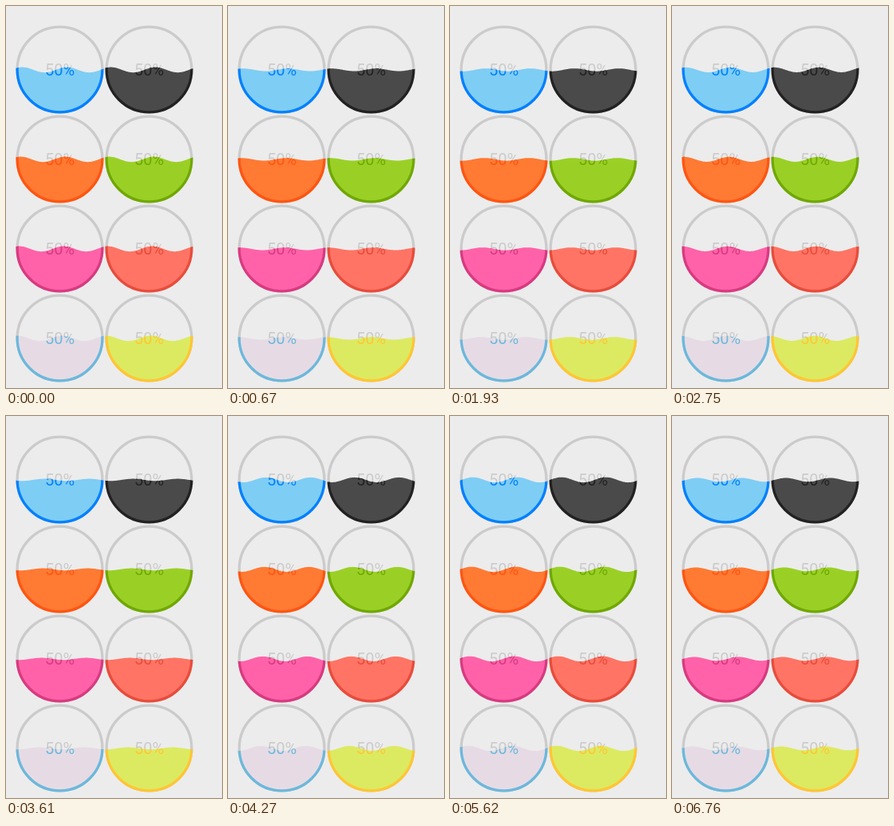
An HTML page with a canvas for the animation above (6.86 s loop, 271x478 px).

```html
<!DOCTYPE html>
<html lang="en">
<head>
<meta charset="utf-8">
<title>Wave gauges</title>
<style>
  html, body { margin: 0; width: 100%; height: 100%; overflow: hidden; background: #ececec; }
  canvas { display: block; width: 271px; height: 478px; }
</style>
</head>
<body>
<canvas id="stage" width="271" height="478"></canvas>
<script>
const ctx = document.getElementById('stage').getContext('2d');
const LOOP = 6860, GREY = '#cbcbcb', TAU = Math.PI * 2;
const RADIUS = 53.4, RING = 3.3, PITCH = 112, WAVELENGTH = 56;

// [liquid, ring and label below the surface]
const themes = [
  ['#7ecdf4', '#0080ff'], ['#4a4a4a', '#222222'],
  ['#ff7a33', '#ff5511'], ['#9ad026', '#70a800'],
  ['#ff62a8', '#d83a80'], ['#ff7464', '#e84c3c'],
  ['#e6dbe4', '#6cb8dc'], ['#dcea62', '#ffc633']
];

// The picture advances in short holds: eight even steps per span.
const spans = [[130, 1090], [1240, 2170], [2320, 3300], [3460, 4420], [4540, 5500], [5620, 6610]];

function heldTime(t) {
  if (t >= 6760) return 6760;
  let held = 0;
  for (const [start, end] of spans) {
    if (t < start) break;
    const step = (end - start) / 7;
    held = start + Math.min(7, Math.floor((t - start) / step)) * step;
  }
  return held;
}

function amplitude(seconds) {
  const phase = (seconds / 1.41) % 1;
  return 1.1 + 2.2 * Math.abs(1 - 2 * phase);
}

function drawGauge(cx, cy, color) {
  ctx.beginPath();
  ctx.arc(cx, cy, RADIUS, 0, TAU);
  ctx.lineWidth = RING;
  ctx.strokeStyle = color;
  ctx.stroke();
  ctx.fillStyle = color;
  ctx.fillText('50%', cx, cy + 7.5);
}

function drawLiquid(cx, cy, index, seconds) {
  const [liquid, accent] = themes[index];
  const crest = 20.5 - 67.5 + 101.1 * seconds - index;
  const height = amplitude(seconds);
  ctx.save();
  ctx.beginPath();
  ctx.moveTo(cx - 56, cy + 57);
  for (let x = -56; x <= 56; x++) {
    ctx.lineTo(cx + x, cy + 0.4 - height * Math.cos(TAU * (x - crest) / WAVELENGTH));
  }
  ctx.lineTo(cx + 56, cy + 57);
  ctx.clip();
  ctx.beginPath();
  ctx.arc(cx, cy, RADIUS, 0, TAU);
  ctx.fillStyle = liquid;
  ctx.fill();
  drawGauge(cx, cy, accent);
  ctx.restore();
}

function render(now) {
  const seconds = heldTime(now % LOOP) / 1000;
  ctx.fillStyle = '#ececec';
  ctx.fillRect(0, 0, 271, 478);
  ctx.font = '20px Roboto, sans-serif';
  ctx.textAlign = 'center';
  themes.forEach((_, i) => {
    const cx = 67.5 + (i % 2) * PITCH;
    const cy = 79.5 + Math.floor(i / 2) * PITCH;
    drawGauge(cx, cy, GREY);
    drawLiquid(cx, cy, i, seconds);
  });
}

const began = performance.now();
function tick() {
  render(performance.now() - began);
  requestAnimationFrame(tick);
}
tick();
</script>
</body>
</html>
```
